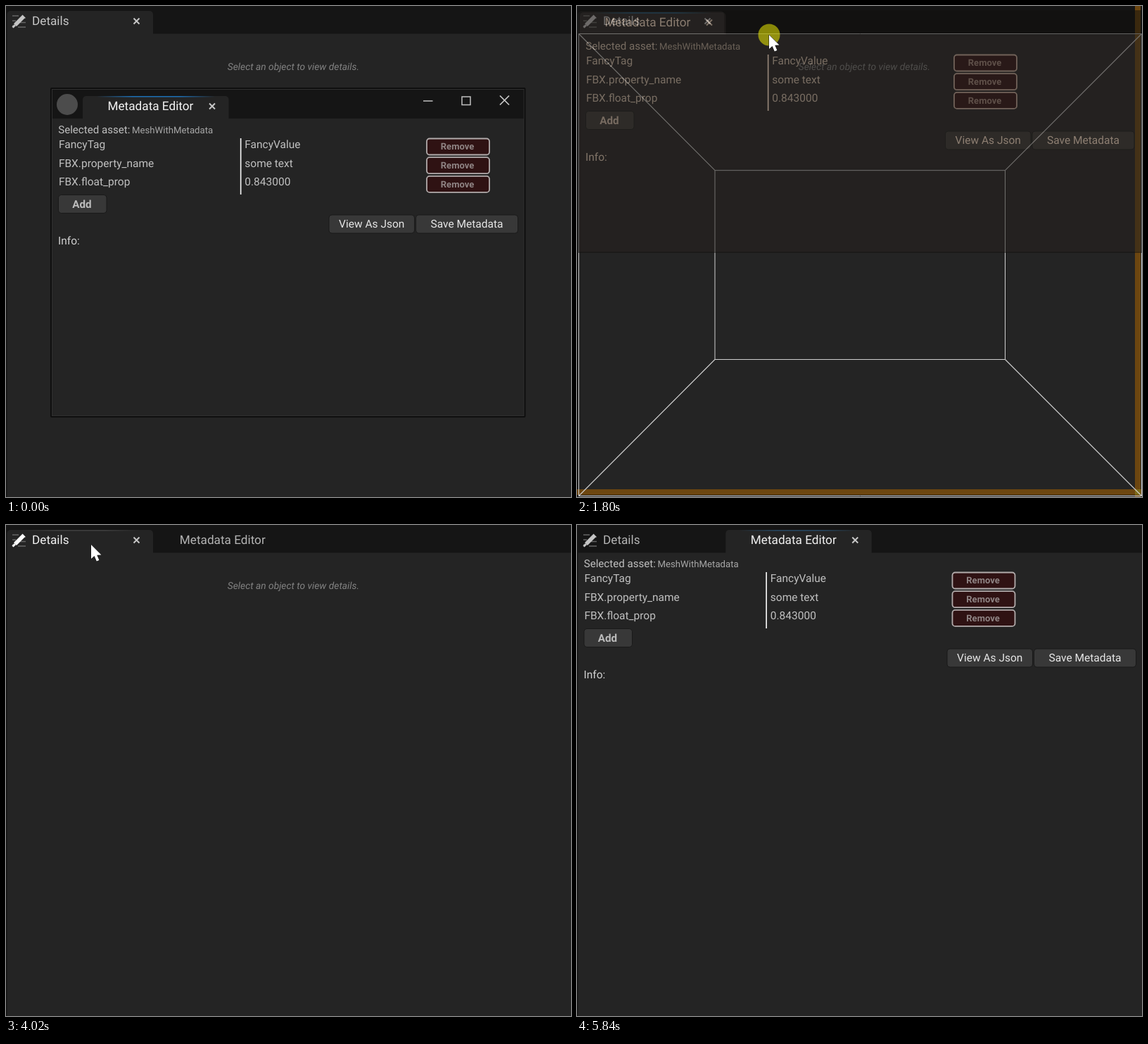
Recreate the animation shown at these times as an HTML page with a canvas. Size 803 by 698 pixels, loop 6.37 s.

```html
<!DOCTYPE html>
<html lang="en">
<head>
<meta charset="utf-8">
<title>Metadata Editor</title>
<style>
html, body { margin: 0; width: 100%; height: 100%; overflow: hidden; background: #151515; }
canvas { display: block; width: 803px; height: 698px; }
</style>
</head>
<body>
<canvas id="stage" width="803" height="698"></canvas>
<script>
const W = 803, H = 698, LOOP = 6370, STEP = 67;
const screen = document.getElementById('stage').getContext('2d');
const spare = Object.assign(document.createElement('canvas'), { width: W, height: H }).getContext('2d');
let c = screen;

const lerp = (a, b, p) => a + (b - a) * p;
const clamp = v => Math.max(0, Math.min(1, v));
const within = (t, a, b) => t >= a && t < b;
const easeOut = (u, power) => 1 - (1 - clamp(u)) ** power;

const ENTER = 330, PRESS = 1200, DRAG = 1330, DOCK = 2660;
const TO_DETAILS = 3900, TO_META = 4790, LEAVE = 5800;

const move = (from, to, x, y) => ({ from, to, x, y });
const MOVES = [
  move(ENTER, 1005, 214, 136),
  move(1206, 1809, 273, 41),
  move(1876, 2211, 279, 28),
  move(2680, 3484, 226, 93),
  move(3484, 3886, 121, 28),
  move(4020, 4230, 180, 75),
  move(4230, 4489, 273, 22),
  move(4760, 5293, 262, 120),
  move(5293, 5829, 588, 700)
];

function pointer(t) {
  let x = 443, y = 628;
  for (const m of MOVES) {
    const p = easeOut((t - m.from) / (m.to - m.from), 1.2);
    x = lerp(x, m.x, p);
    y = lerp(y, m.y, p);
  }
  return { x, y };
}

function rect(x, y, w, h, color) {
  c.fillStyle = color;
  c.fillRect(x, y, w, h);
}

function round(x, y, w, h, r, fill, stroke, width = 1) {
  c.beginPath();
  c.roundRect(x, y, w, h, r);
  c.fillStyle = fill;
  c.fill();
  if (!stroke) return;
  c.strokeStyle = stroke;
  c.lineWidth = width;
  c.stroke();
}

function disc(x, y, r, color) {
  c.fillStyle = color;
  c.beginPath();
  c.arc(x, y, r, 0, 7);
  c.fill();
}

function line(x0, y0, x1, y1, color, width) {
  c.strokeStyle = color;
  c.lineWidth = width;
  c.beginPath();
  c.moveTo(x0, y0);
  c.lineTo(x1, y1);
  c.stroke();
}

function text(s, x, y, size, color, style = '', align = 'left') {
  c.font = `${style} ${size}px Roboto, Arial, sans-serif`;
  c.textRendering = 'geometricPrecision';
  c.textAlign = align;
  c.fillStyle = color;
  c.fillText(s, x, y);
}

function cross(x, y, r, width) {
  for (const s of [-r, r]) line(x - r, y - s, x + r, y + s, '#c8c8c8', width);
}

// Draws a group on its own surface so that it fades as a whole
function layer(alpha, draw) {
  c = spare;
  c.clearRect(0, 0, W, H);
  c.save();
  draw();
  c.restore();
  c = screen;
  c.globalAlpha = alpha;
  c.drawImage(spare.canvas, 0, 0);
  c.globalAlpha = 1;
}

function tab(x, title, { fill, glow, color }) {
  if (fill) {
    round(x, 7, 207.5, 33, [5, 5, 0, 0], fill);
    cross(x + 184, 21.5, 4, 1.9);
  }
  if (glow) {
    const g = c.createLinearGradient(x + 20, 0, x + 188, 0);
    g.addColorStop(0, fill);
    g.addColorStop(.3, glow);
    g.addColorStop(.7, glow);
    g.addColorStop(1, fill);
    rect(x + 20, 7, 168, 1.5, g);
  }
  text(title, x + 35.5, 27, 17.2, color);
}

function pencil(color) {
  for (let i = 0; i < 3; i++) {
    line(9, 14 + 7 * i, 18 - 4 * i, 14 + 7 * i, '#666', 1.5);
    line(23 - 3 * i, 17 + 6.5 * i, 28, 17 + 6.5 * i, '#666', 1.5);
  }
  line(13, 27, 25.5, 14.5, color, 5.5);
  line(9.5, 30.5, 13, 27, color, 3);
}

function button(x, w, label) {
  round(x, 176, w, 26, 4, '#383838', '#191919');
  text(label, x + w / 2, 194, 15.5, '#e6e6e6', '', 'center');
}

function metadata(right) {
  text('Selected asset:', 9.7, 60, 15.1, '#c0c0c0');
  text('MeshWithMetadata', 114.5, 60, 13.2, '#a8a8a8');
  const rows = { FancyTag: 'FancyValue', 'FBX.property_name': 'some text', 'FBX.float_prop': '0.843000' };
  Object.entries(rows).forEach(([key, value], i) => {
    const y = 26.7 * i;
    text(key, 10.4, 81 + y, 15.5, '#c0c0c0');
    text(value, 274.8, 81 + y, 15.5, '#c0c0c0');
    round(533.5, 67.5 + y, 89, 23, 4, '#2f1213', '#b2abab', 1.8);
    text('Remove', 577, 83.4 + y, 13, '#8f8484', 'bold', 'center');
  });
  rect(268.3, 67, 1.7, 80, '#f0f0f0');
  round(10, 147.5, 68.5, 26, 4, '#383838', '#191919');
  text('Add', 43.5, 166, 15.2, '#bdbdbd', 'bold', 'center');
  button(right - 268, 121.5, 'View As Json');
  button(right - 144.5, 145, 'Save Metadata');
  text('Info:', 9.5, 218, 15.5, '#d0d0d0');
}

function floatingWindow() {
  round(63, 116, 675.5, 469, 2, '#0e0e0e');
  rect(65, 118, 671.5, 465, '#303030');
  rect(66, 119, 669.5, 463, '#242424');
  rect(66, 119, 669.5, 41, '#151515');
  disc(87, 140, 15, '#4c4c4c');
  line(593, 135, 606.5, 135, '#c0c0c0', 1.5);
  c.strokeRect(648, 129, 12, 11.5);
  cross(708.5, 134, 6.5, 1.7);
  c.translate(64.5, 121);
  tab(44.5, 'Metadata Editor', { fill: '#242424', glow: '#1c6fb5', color: '#f4f4f4' });
  metadata(662.5);
}

// Preview of the window, stretched while it grows into the dock area
function ghost(p) {
  const x = lerp(64, 2, p), y = lerp(116, 6, p);
  const stretch = Math.min(1, p / .2, (1 - p) / .3);
  const sx = 1 + .056 * stretch, sy = 1 - .08 * stretch;
  const w = lerp(674, 801, p) / sx, h = (lerp(576, 351, p) - y) / sy;
  c.translate(x + .5, y - 4 * sy);
  c.scale(sx, sy);
  rect(-.5, 4, w, h, '#101010');
  rect(.5, 38.5, w - 2, h - 36, '#242424');
  tab(1.5, 'Metadata Editor', { fill: '#242424', glow: '#1d5788', color: '#e0e0e0' });
  metadata(w - 12);
  c.globalCompositeOperation = 'multiply';
  rect(-.5, 4, w, h, '#ffe2c8');
  c.globalCompositeOperation = 'source-over';
}

function dockTargets() {
  rect(793, 0, 8, H, '#6c4610');
  rect(0, 687, W, 8, '#6c4610');
  rect(793, 687, 8, 8, '#7c6a18');
  const outer = { x: [2.5, 802.5], y: [39.5, 696.5] };
  const inner = { x: [196, 608.5], y: [233.7, 502.5] };
  const color = '#d0d0d0';
  for (const { x, y } of [outer, inner])
    for (const i of [0, 1]) {
      line(x[0], y[i], x[1], y[i], color, 1);
      line(x[i], y[0], x[i], y[1], color, 1);
    }
  for (const i of [0, 1])
    for (const j of [0, 1]) line(outer.x[i], outer.y[j], inner.x[i], inner.y[j], color, 1.1);
}

function arrow(x, y) {
  const path = new Path2D(`M${x} ${y} v20 l4.6 -4 l3.2 7.5 l3.6 -1.5 l-3.1 -7.2 l6.2 -.4 z`);
  c.strokeStyle = '#111';
  c.lineWidth = 1;
  c.stroke(path);
  c.fillStyle = '#fff';
  c.fill(path);
}

function beam(x, y) {
  for (const [color, width] of [['#111', 3.4], ['#f4f4f4', 1.8]]) {
    line(x, y - 11, x, y + 11, color, width);
    for (const s of [-11, 11]) line(x - 6, y + s, x + 6, y + s, color, width);
  }
}

function tooltip() {
  round(296.5, 35.5, 135, 42, 2, '#a8a8a8', '#b8b8b8');
  text('Metadata Editor', 364.3, 62, 15.6, '#101010', '', 'center');
}

function base(cur, docked, meta) {
  const over = (a, b) => docked && within(cur.y, 7, 39) && within(cur.x, a, b);
  const look = (active, hover) => ({
    fill: active ? '#242424' : hover ? '#1e1e1e' : '',
    glow: docked && active ? meta ? '#264863' : '#404040' : '',
    color: docked && (active || hover) ? '#f0f0f0' : docked ? '#b4b4b4' : '#c6c6c6'
  });
  rect(0, 0, W, H, '#151515');
  rect(1.5, 39.5, W, H, '#242424');
  tab(1.5, 'Details', look(!meta, over(0, 210)));
  pencil(docked && !meta ? '#fff' : '#c4c4c4');
  if (docked) tab(211.3, 'Metadata Editor', look(meta, over(211, 419)));
  if (meta) metadata(794);
  else text('Select an object to view details.', 408.4, 91, 13.8, '#828282', 'italic', 'center');
}

function dragging(t) {
  const out = clamp((t - 1340) / 260);
  layer(1 - out, () => {
    const s = 1 - .045 * out;
    c.translate(400.5 * (1 - s), 350 * (1 - s));
    c.scale(s, s);
    floatingWindow();
  });
  dockTargets();
  layer(.54, () => ghost(easeOut((t - 1390) / 380, 1.3)));
}

function draw(t) {
  const cur = pointer(t);
  const docked = t >= DOCK, meta = docked && !within(t, TO_DETAILS, TO_META);
  base(cur, docked, meta);
  if (t < DRAG) {
    c.save();
    floatingWindow();
    c.restore();
  } else if (!docked) dragging(t);
  if (within(t, 4470, TO_META)) layer(clamp((t - 4458) / 155), tooltip);
  if (!within(t, ENTER, LEAVE)) return;
  const clicking = [TO_DETAILS, TO_META].some(at => within(t, at - 40, at + 90));
  if (clicking || within(t, PRESS, DOCK)) disc(cur.x, cur.y, 15.5, 'rgba(255, 255, 0, .5)');
  const typing = meta && within(cur.y, 66, 146) && cur.x < 530;
  (typing ? beam : arrow)(cur.x, cur.y);
}

// The picture moves in even ticks
function tick() {
  const t = performance.now() % LOOP;
  draw(Math.floor((t + 14) / (LOOP / 95)) % 95 * STEP);
  requestAnimationFrame(tick);
}
tick();
</script>
</body>
</html>
```
